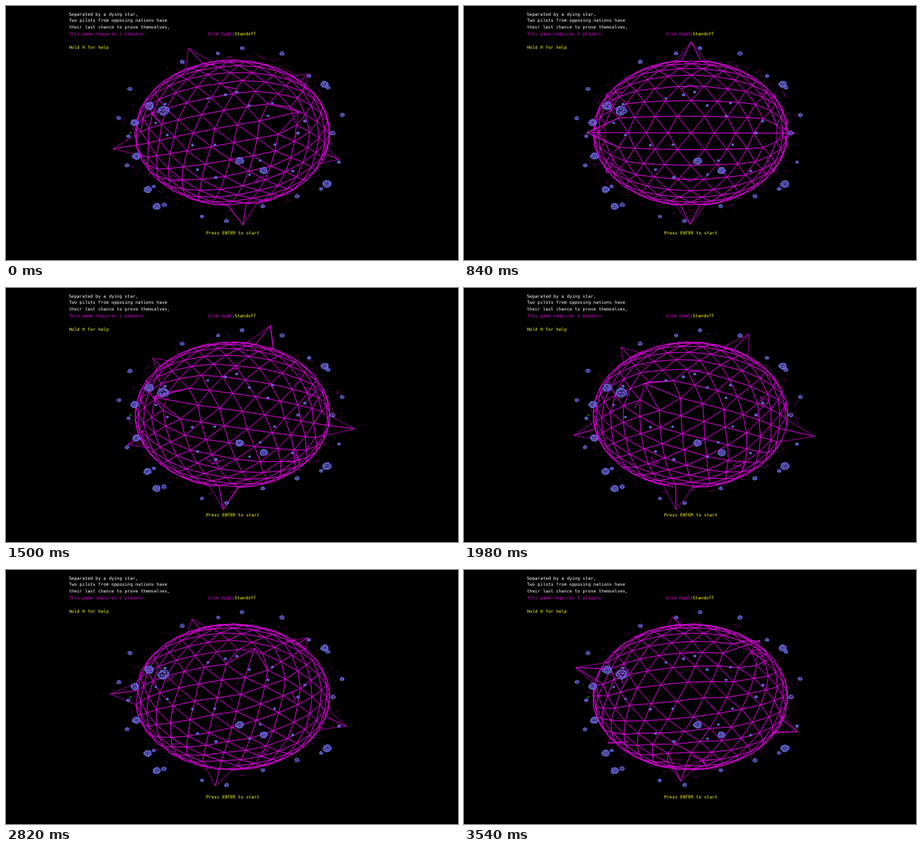
These frames come from a looping animation (600x338 px, 3600 ms). An HTML page with a canvas:

```html
<!DOCTYPE html>
<html lang="en">
<head>
<meta charset="utf-8">
<title>Title screen</title>
<style>
  html, body { margin: 0; width: 100%; height: 100%; overflow: hidden; background: #000; }
  canvas, svg { position: absolute; left: 0; top: 0; width: 600px; height: 338px; }
  text { font: 5.86px "DejaVu Sans Mono", "Liberation Mono", monospace; white-space: pre; fill: #fff; }
  .m { fill: #e000e0; }
  .y { fill: #ffff20; }
  .mid { text-anchor: middle; }
</style>
</head>
<body>
<canvas id="view" width="600" height="338"></canvas>
<svg viewBox="0 0 600 338">
  <text x="83.5" y="12.5">Separated by a dying star,</text>
  <text x="83.5" y="21.3">Two pilots from opposing nations have</text>
  <text x="83.5" y="30.1">their last chance to prove themselves,</text>
  <text x="83.5" y="38.9" class="m">This game requires 2 players.</text>
  <text x="83.5" y="56.5" class="y">Hold H for help</text>
  <text x="300" y="38.9" class="mid"><tspan class="m">Grim Opal</tspan>:<tspan class="y">Standoff</tspan></text>
  <text x="301" y="303.5" class="mid y">Press ENTER to start</text>
</svg>
<script>
const LOOP = 3600, STEP = 60;
const SPIN = Math.PI / 180 / (STEP / 1000);   // one degree per step
const LEVEL_AT = 0.825;                       // seconds at which the star stands upright
const GOLDEN = Math.PI * (3 - Math.sqrt(5));
const ctx = document.getElementById('view').getContext('2d');

let seed = 7;
const rand = () => (seed = seed * 16807 % 2147483647) / 2147483647;

const dot = (a, b) => a[0] * b[0] + a[1] * b[1] + a[2] * b[2];
const scale = (v, k) => v.map(n => n * k);
const unit = v => scale(v, 1 / Math.hypot(...v));
const middle = (a, b) => unit(a.map((n, i) => n + b[i]));

// Icosahedron split `depth` times; corners stay shared between faces.
function icosphere(depth) {
  const corners = [];
  const phi = (1 + Math.sqrt(5)) / 2;
  for (const a of [-1, 1])
    for (const b of [-phi, phi])
      corners.push(unit([a, 0, b]), unit([0, b, a]), unit([b, a, 0]));

  let faces = [];
  const near = (a, b) => dot(a, b) > 0.4;
  corners.forEach((a, i) => corners.slice(i + 1).forEach((b, j) => {
    if (!near(a, b)) return;
    corners.slice(i + j + 2).forEach(c => {
      if (!near(a, c) || !near(b, c)) return;
      const cross = [a[1] * b[2] - a[2] * b[1], a[2] * b[0] - a[0] * b[2], a[0] * b[1] - a[1] * b[0]];
      faces.push(dot(cross, c) > 0 ? [a, b, c] : [a, c, b]);
    });
  }));

  while (depth--) {
    faces = faces.flatMap(([a, b, c]) => {
      const ab = middle(a, b), bc = middle(b, c), ca = middle(c, a);
      return [[a, ab, ca], [ab, b, bc], [ca, bc, c], [ab, bc, ca]];
    });
  }
  return { corners, faces };
}

function rock(depth) {
  const bump = v => scale(v, 0.94 + 0.12 * Math.sin(7 * v[0] + 5 * v[1] - 9 * v[2]));
  return icosphere(depth).faces.map(f => f.map(bump));
}

// Roll about z, then turn about y.
function rotate([x, y, z], turn, roll) {
  const cr = Math.cos(roll), sr = Math.sin(roll), ct = Math.cos(turn), st = Math.sin(turn);
  const x1 = cr * x - sr * y;
  return [ct * x1 + st * z, sr * x + cr * y, ct * z - st * x1];
}

// A unit sphere seen from distance d fills the ellipse rx, ry.
function project([x, y, z], o) {
  const k = Math.sqrt(o.d * o.d - 1) / (o.d - z);
  return [o.x + x * k * o.rx, o.y - y * k * o.ry];
}

// Only faces turned towards the viewer are outlined.
function drawMesh(faces, o) {
  ctx.beginPath();
  for (const face of faces) {
    const [a, b, c] = face.map(v => project(rotate(v, o.turn, o.roll), o));
    const area = (b[0] - a[0]) * (c[1] - a[1]) - (b[1] - a[1]) * (c[0] - a[0]);
    if (area >= 0) continue;
    ctx.moveTo(...a);
    ctx.lineTo(...b);
    ctx.lineTo(...c);
    ctx.closePath();
  }
  ctx.stroke();
}

const star = icosphere(3);
const tips = star.corners.map(v => ({ v, base: [...v] }));

// The twelve corners stand out as spikes that breathe a little.
function poseSpikes(t) {
  const length = 1.187 + 0.02 * Math.cos((t - 1.8) / 2.6 * 2 * Math.PI);
  for (const { v, base } of tips) base.forEach((n, i) => { v[i] = n * length; });
}

const rockMeshes = [rock(0), rock(1)];

// Boulders at key places, the largest first.
const boulders = [
  [209, 139], [190, 133], [426, 237], [310, 206], [171, 155],
  [173, 200], [342, 219], [188, 244], [423, 104], [200, 267]
].map(([x, y], i) => ({ x, y, r: 5 + 3 / (i + 1) }));

// Stones on a loose ring, then pebbles strewn over the star.
const scatter = (count, near, far, small, big) => Array.from({ length: count }, (_, i) => {
  const angle = i * GOLDEN, reach = near + (far - near) * rand();
  return {
    x: 300 + 130 * reach * Math.cos(angle),
    y: 169 + 97 * reach * Math.sin(angle),
    r: small + (big - small) * rand()
  };
});
const debris = [
  ...boulders,
  ...scatter(20, 1.03, 1.22, 2.3, 4),
  ...scatter(19, 0.2, 0.85, 1.5, 2.5)
];

const sparks = Array.from({ length: 190 }, () => {
  const a = unit([rand() - 0.5, rand() - 0.5, rand() - 0.5]);
  const b = unit(a.map(n => n + (rand() - 0.5) * 0.09));
  const r = 1.01 + rand() * 0.1;
  return [scale(a, r), scale(b, r)];
});

function drawSparks(o) {
  ctx.beginPath();
  for (const [a, b] of sparks) {
    const p = rotate(a, o.turn, o.roll);
    if (p[2] < 0.2) continue;
    ctx.moveTo(...project(p, o));
    ctx.lineTo(...project(rotate(b, o.turn, o.roll), o));
  }
  ctx.stroke();
}

function pen(color, width) {
  ctx.strokeStyle = color;
  ctx.lineWidth = width;
}

function drawShip(x, color) {
  ctx.fillStyle = color;
  ctx.fillRect(x - 1, 168.2, 2, 1.5);
}

function draw(ms) {
  const t = ms / 1000;
  const angle = (t - LEVEL_AT) * SPIN;
  const view = { x: 300.5, y: 168.9, rx: 129.6, ry: 97.2, d: 2, turn: angle, roll: -angle };

  ctx.fillStyle = '#000';
  ctx.fillRect(0, 0, 600, 338);

  pen('#98008c', 0.65);
  drawSparks(view);
  poseSpikes(t);
  pen('#e000e0', 0.66);
  drawMesh(star.faces, view);

  pen('#6a6ae0', 0.6);
  debris.forEach(({ x, y, r }, i) => {
    const spin = i * 1.7 + t * (0.5 + i % 4 * 0.15);
    drawMesh(rockMeshes[r > 4.5 ? 1 : 0], { x, y, rx: r, ry: r * 0.82, d: 6, turn: spin, roll: -spin });
  });

  drawShip(165, '#00b000');
  drawShip(435, '#b00000');
}

const start = performance.now();
function tick() {
  const ms = (performance.now() - start) % LOOP;
  draw(Math.floor(ms / STEP) * STEP);
  requestAnimationFrame(tick);
}
tick();
</script>
</body>
</html>
```
